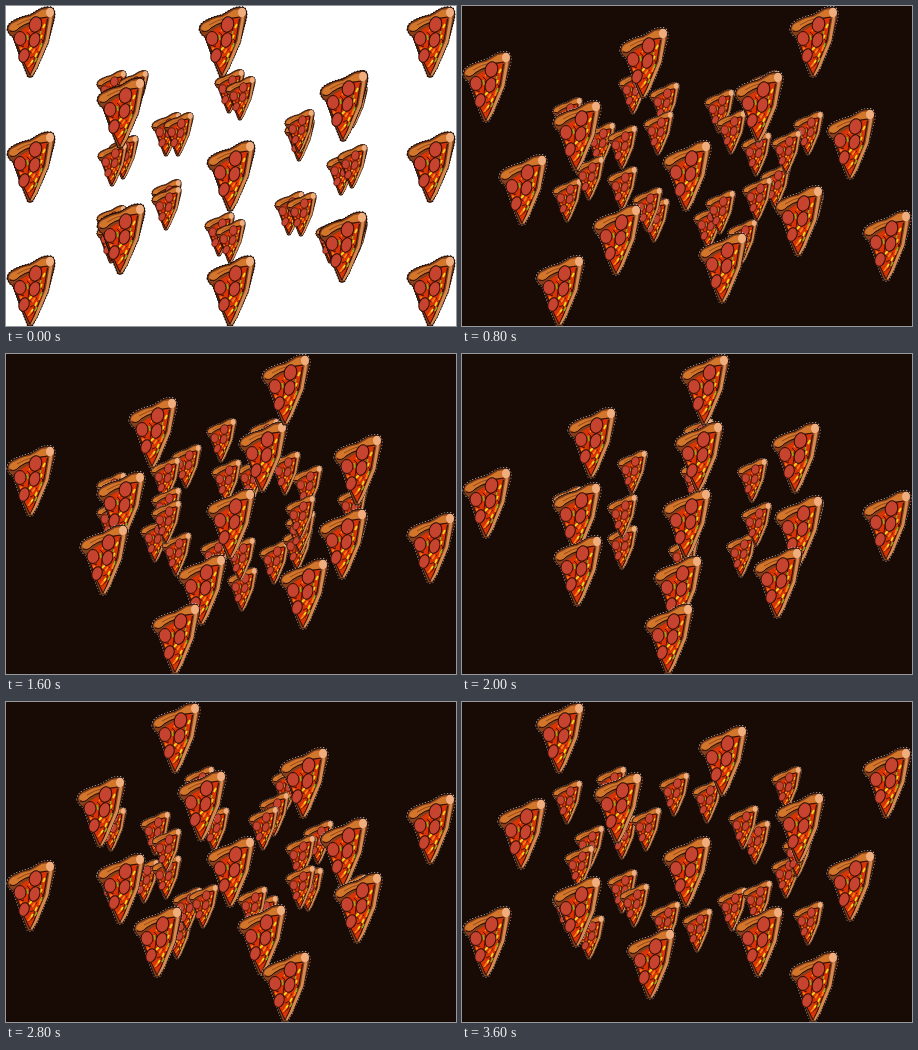
These frames come from a looping animation (450 px wide and 320 px high, 4000 ms). An HTML page:

```html
<!DOCTYPE html>
<html lang="en">
<head>
<meta charset="utf-8">
<title>Pizza slices</title>
<style>
html, body { margin: 0; width: 100%; height: 100%; overflow: hidden; }
svg { display: block; width: 450px; height: 320px; }
.ink { fill: none; stroke: #2c0d04; vector-effect: non-scaling-stroke; }
</style>
</head>
<body>
<svg id="stage" viewBox="0 0 450 320" xmlns="http://www.w3.org/2000/svg">
  <defs>
    <path id="outline" d="M1.5 24Q1 18 8 14.5Q14 11 24 9Q29 6 34 3Q40 0 46 1.5Q50 5 48 13L42 37L31 62L26 71L22 71L15 53L7 31Q3 29 1.5 24Z"/>
    <g id="slice" stroke-linejoin="round">
      <use id="edge" href="#outline" stroke-width="1.7" stroke-dasharray="1.3 1.7"/>
      <use href="#outline" fill="#86401a" stroke="#180a05" stroke-width=".9"/>
      <path d="M9 28L24 19L41 10L39 27L33 48L24 69L16 52Z" fill="#d93308"/>
      <path d="M45 11L41 35L30 61L25 69" fill="none" stroke="#d68a50" stroke-width="2.8"/>
      <path class="ink" d="M41.5 13L38 34L28 61L24 69L15.500 51L8 29"/>
      <path d="M3 23Q3 18 10 16Q16 12 24 11Q30 8 36 4L44 3L42 11Q35 10 28 14Q17 18 12 23Q8 27 3 23Z" fill="#d2762b"/>
      <path class="ink" d="M4 25Q9 27 13 22Q18 18 27 16Q34 11 42 11"/>
      <path d="M11 19Q19 14 28 12" fill="none" stroke="#93471a"/>
      <ellipse cx="44" cy="6.500" rx="4" ry="4.800" fill="#f0ae7e"/>
      <path class="ink" stroke-width=".8" d="M21 26L24 29L22 43L25 47L31 43M35 22L33 31L37 35L34 43M24 52L29 50L27 58L22 62M15 41L18 40"/>
      <path d="M23 25L25 23M26 47L29 43M33 45L35 39M22 61L25 57M14 43L16 42" stroke="#ff7d10" stroke-width="2"/>
      <path d="M37 22L39 18M34 33L36 29M23 44L26 41M29 51L31 47M25 57L27 54" stroke="#f2d81c" stroke-width="1.800"/>
      <path d="M21 29L22 34M36 37L35 41M31 52L29 56M35 25L34 28" stroke="#8ea81e" stroke-width="1.600"/>
      <g fill="#c5432f">
        <ellipse cx="29.500" cy="18.500" rx="6.200" ry="7.800" transform="rotate(15 29.500 18.500)"/>
        <ellipse cx="14" cy="32.500" rx="6" ry="7"/>
        <ellipse cx="28.500" cy="34" rx="5.200" ry="7.500" transform="rotate(18 28.500 34)"/>
        <ellipse cx="18" cy="49.500" rx="5" ry="7" transform="rotate(20 18 49.500)"/>
      </g>
      <g class="ink">
        <ellipse cx="29.500" cy="18.500" rx="6.200" ry="7.800" transform="rotate(15 29.500 18.500)"/>
        <ellipse cx="14" cy="32.500" rx="6" ry="7"/>
        <ellipse cx="28.500" cy="34" rx="5.200" ry="7.500" transform="rotate(18 28.500 34)"/>
        <ellipse cx="18" cy="49.500" rx="5" ry="7" transform="rotate(20 18 49.500)"/>
      </g>
    </g>
  </defs>
  <rect id="back" width="450" height="320"/>
</svg>
<script>
const STEP = 400, STEPS = 10, LEG = STEPS + 1, SMALL = 0.62;
const stage = document.getElementById("stage");
const back = document.getElementById("back");
const edge = document.getElementById("edge");
const slices = [];

function addSlice(scale, place) {
  const node = document.createElementNS("http://www.w3.org/2000/svg", "use");
  node.setAttribute("href", "#slice");
  stage.append(node);
  slices.push({ node, scale, place });
}

// A slice on a leg covers it in LEG steps.
const leg = (from, to) => step => from.map((v, i) => v + (to[i] - v) * step / LEG);

// One slice for each leg between neighbouring points.
const chain = (...points) => points.slice(1).map((to, i) => leg(points[i], to));
const ring = (...points) => chain(...points, points[0]);
const box = (left, top, right, bottom) =>
  ring([left, top], [left, bottom], [right, bottom], [right, top]);

// Small slices circle each ring in both directions.
const smallRings = [
  box(90, 64, 331, 213),
  ring([208, 63], [91, 136], [209, 213], [331, 138]),
  ring([145, 106], [145, 180], [280, 186], [278, 103])
];
for (const place of smallRings.flat()) {
  addSlice(SMALL, place);
  addSlice(SMALL, step => place(STEPS - step));
}

// Large slices circle a middle box, the whole stage and a diamond.
const largeLegs = [
  leg([200, 134], [200, 134]),
  ...ring([313, 64], [90, 71], [90, 197], [312, 205]),
  ...box(0, 0, 400, 249),
  ...chain([0, 125], [200, 249], [400, 125], [200, 0]),
  ...chain([192, 0], [0, 117])
];
largeLegs.forEach(place => addSlice(1, place));

let shown = -1;
function draw(now) {
  const step = Math.floor(now / STEP) % STEPS;
  if (step === shown) return;
  shown = step;
  back.setAttribute("fill", step ? "#180b06" : "#fff");
  edge.setAttribute("stroke", step ? "#e8e4e0" : "#180b06");
  for (const { node, scale, place } of slices) {
    const [x, y] = place(step).map(Math.round);
    node.setAttribute("transform", `translate(${x} ${y}) scale(${scale})`);
  }
}

function loop() {
  draw(performance.now());
  requestAnimationFrame(loop);
}
loop();
</script>
</body>
</html>
```
